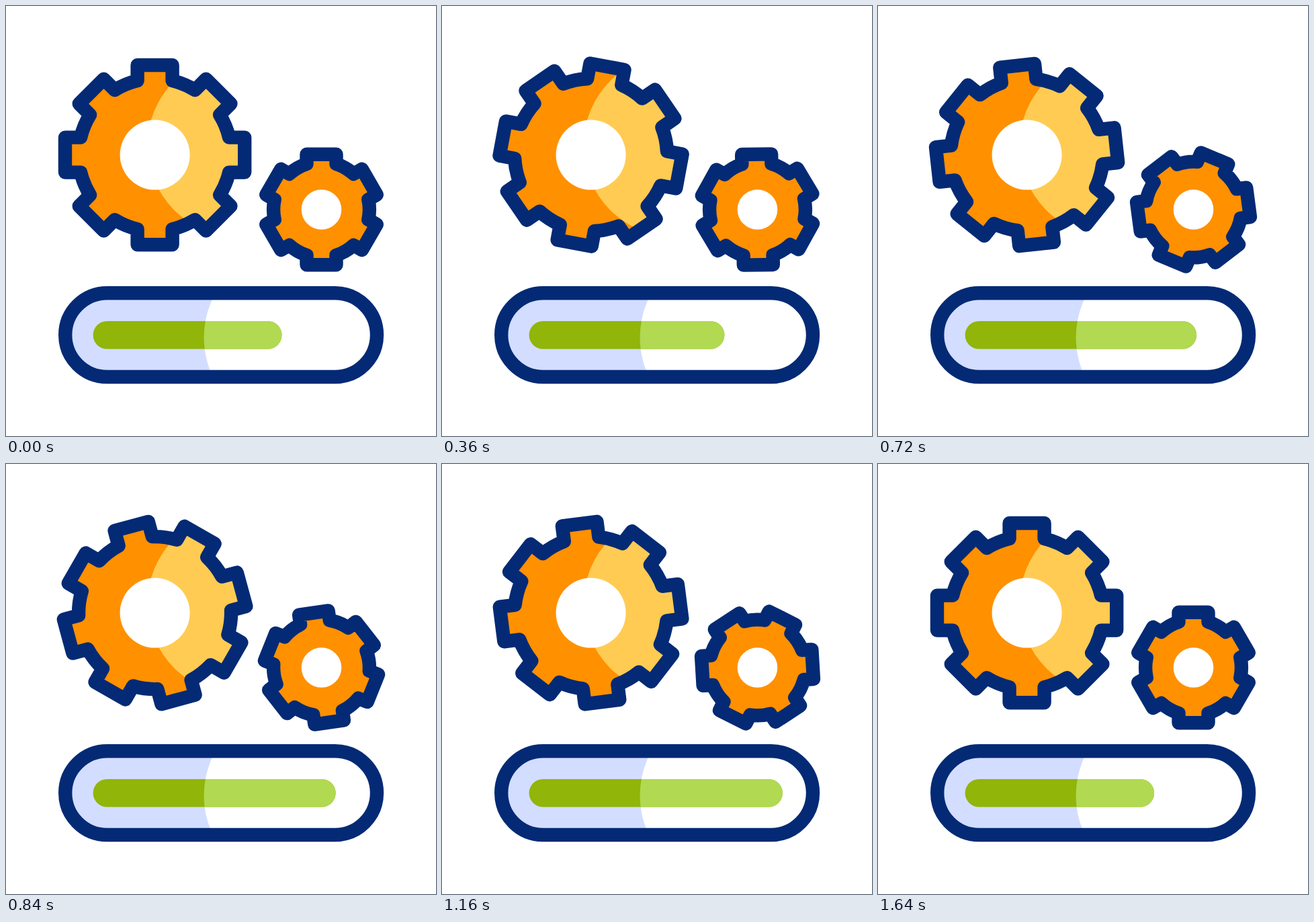
An HTML page for the animation above (1680 ms loop, 640 by 640 pixels).

```html
<!DOCTYPE html>
<html lang="en">
<head>
<meta charset="utf-8">
<title>Gears and progress</title>
<style>
  html, body { margin: 0; width: 100%; height: 100%; overflow: hidden; background: #fff; }
  svg { display: block; width: 100%; height: 100%; }
  .line { fill: none; stroke: #042a75; stroke-width: 20.4; stroke-linejoin: round; }
  .orange { fill: #ff9000; }
  .white { fill: #fff; }
</style>
</head>
<body>
<svg viewBox="0 0 640 640">
  <defs>
    <path id="big"/>
    <path id="small"/>
    <rect id="track" x="88.2" y="427.2" width="463.8" height="124.8" rx="62.4"/>
    <circle id="lens" cx="430.6" cy="493.4" r="136"/>
    <clipPath id="inBig"><use href="#big"/></clipPath>
    <clipPath id="inTrack"><use href="#track"/></clipPath>
    <clipPath id="inLens"><use href="#lens"/></clipPath>
  </defs>

  <use href="#big" class="orange"/>
  <circle cx="346.8" cy="207.6" r="136.2" fill="#ffcb52" clip-path="url(#inBig)"/>
  <circle cx="221.6" cy="221.6" r="52" class="white"/>
  <use href="#big" class="line"/>

  <use href="#small" class="orange"/>
  <circle cx="469.5" cy="303" r="29.8" class="white"/>
  <use href="#small" class="line"/>

  <use href="#track" fill="#d3ddff"/>
  <use href="#lens" class="white" clip-path="url(#inTrack)"/>
  <rect class="bar" x="129.6" y="469" width="281" height="41.5" rx="20.75" fill="#91b508"/>
  <g clip-path="url(#inLens)">
    <rect class="bar" x="129.6" y="469" width="281" height="41.5" rx="20.75" fill="#b1d952"/>
  </g>
  <use href="#track" class="line"/>
</svg>
<script>
  const LOOP = 1680, STEP = 40;
  const big = document.getElementById('big');
  const small = document.getElementById('small');
  const bars = document.querySelectorAll('.bar');

  // Outline around the origin: straight teeth joined by arcs of the body circle
  function gearPath(teeth, tip, body, half) {
    const root = Math.sqrt(body * body - half * half);
    const corners = [[-half, -root], [-half, -tip], [half, -tip], [half, -root]];
    let d = '';
    for (let i = 0; i < teeth; i++) {
      const a = i * 2 * Math.PI / teeth, c = Math.cos(a), s = Math.sin(a);
      corners.forEach(([x, y], k) => {
        const cmd = k ? 'L' : i ? `A${body} ${body} 0 0 1 ` : 'M';
        d += `${cmd}${(x * c - y * s).toFixed(2)} ${(x * s + y * c).toFixed(2)}`;
      });
    }
    return `${d}A${body} ${body} 0 0 1 ${-half} ${-root.toFixed(2)}Z`;
  }

  // Symmetric cubic-bezier(k, 0, 1 - k, 1) between two times
  function ease(t, from, to, k) {
    const x = Math.min(1, Math.max(0, (t - from) / (to - from)));
    let lo = 0, hi = 1, s = x;
    for (let i = 0; i < 24; i++) {
      const r = 1 - s;
      if (3 * k * s * r * r + 3 * (1 - k) * s * s * r + s * s * s < x) lo = s;
      else hi = s;
      s = (lo + hi) / 2;
    }
    return x === 0 || x === 1 ? x : s * s * (3 - 2 * s);
  }

  const place = (el, x, y, turn) =>
    el.setAttribute('transform', `translate(${x} ${y}) rotate(${turn.toFixed(3)})`);

  function draw(now) {
    const t = Math.floor(now % LOOP / STEP) * STEP;
    place(big, 221.6, 221.6, 180 * ease(t, 97, 1383, 0.55));
    place(small, 469.5, 303, -180 * ease(t, 276, 1546, 0.55));
    const fill = ease(t, 60, 1210, 0.55) - ease(t, 1210, 1665, 0.42);
    bars.forEach(b => b.setAttribute('width', (280.9 + 96.6 * fill).toFixed(2)));
  }

  big.setAttribute('d', gearPath(8, 133.6, 113.5, 26));
  small.setAttribute('d', gearPath(6, 82.3, 71.4, 22));

  const start = performance.now();
  function tick() {
    draw(performance.now() - start);
    requestAnimationFrame(tick);
  }
  tick();
</script>
</body>
</html>
```
